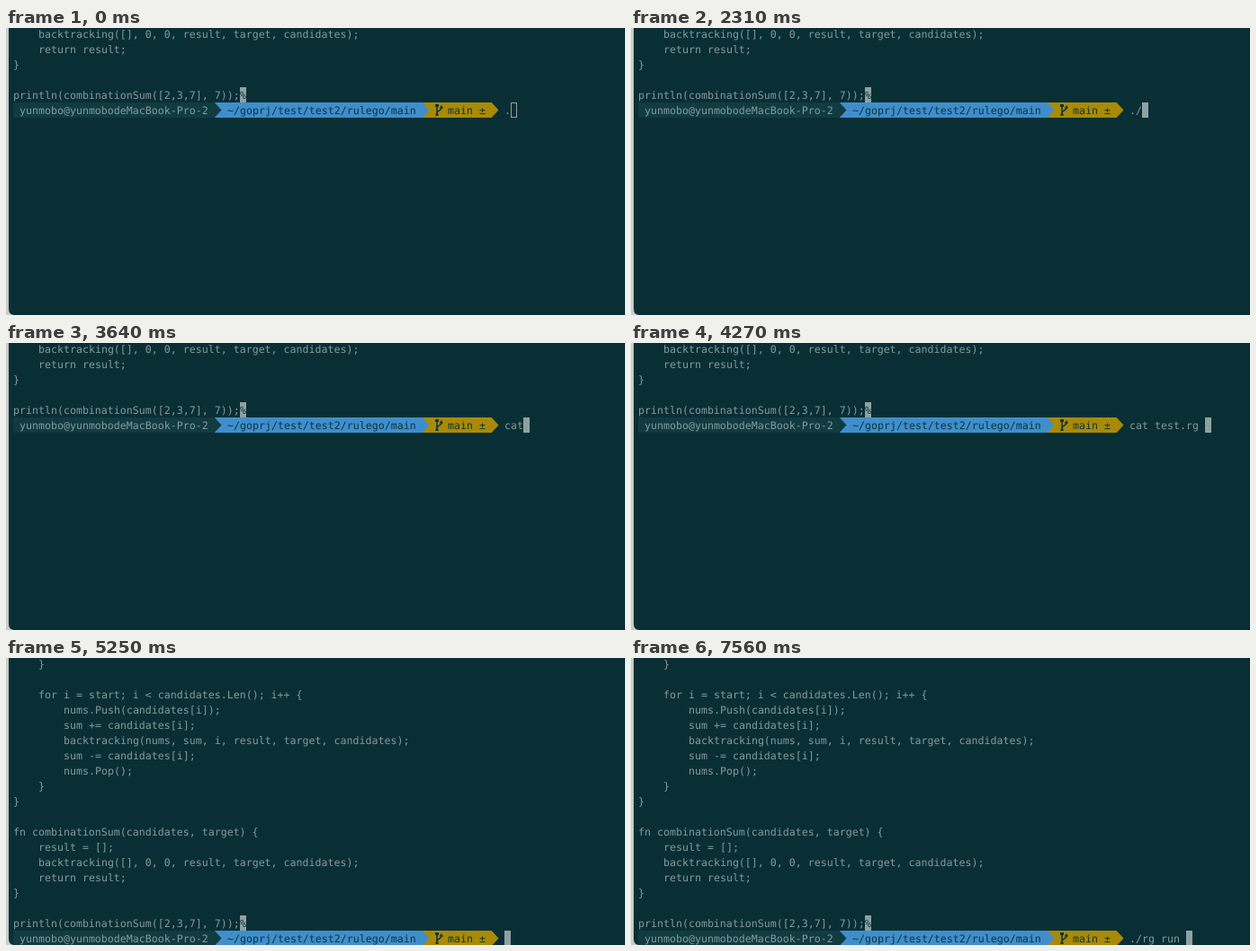
These frames come from a looping animation (688x320 px, 8000 ms). An HTML page:

```html
<!DOCTYPE html>
<html lang="en">
<head>
<meta charset="utf-8">
<title>Terminal session</title>
<style>
html, body { margin: 0; width: 100%; height: 100%; overflow: hidden; background: #092f35; }
svg { display: block; width: 688px; height: 320px; }
text {
  font: 11.628px "DejaVu Sans Mono", monospace;
  white-space: pre;
  text-rendering: geometricPrecision;
  fill: #869a9a;
}
text.dark { fill: #0a3540; }
</style>
</head>
<body>
<svg id="stage" viewBox="0 0 688 320"></svg>
<script>
const LOOP = 8000, CELL = 7, ROW = 17, LEFT = 8, TOP = -2;
const C = { bg: '#092f35', host: '#103b41', blue: '#3f8ecb', gold: '#a98a07', ink: '#0a3540', cursor: '#8ea1a0', edge: '#c7cbca' };
const stage = document.getElementById('stage');
const colX = c => LEFT + c * CELL;
const rowY = r => TOP + r * ROW;

function add(parent, tag, attrs = {}, content) {
  const el = document.createElementNS('http://www.w3.org/2000/svg', tag);
  for (const key in attrs) el.setAttribute(key, attrs[key]);
  if (content !== undefined) el.textContent = content;
  parent.appendChild(el);
  return el;
}

const box = (parent, x, y, width, height, fill) => add(parent, 'rect', { x, y, width, height, fill });

function write(parent, col, row, str, cls = '') {
  // leading blanks become an x offset
  const indent = str.length - str.trimStart().length;
  return add(parent, 'text', { x: colX(col + indent), y: rowY(row) + 13, class: cls }, str.trimStart());
}

function arrow(parent, col, y, fill) {
  const x = colX(col);
  add(parent, 'path', { d: `M${x - .3} ${y}L${x + 7.5} ${y + ROW / 2}L${x - .3} ${y + ROW}Z`, fill });
}

function prompt(parent, row) {
  const g = add(parent, 'g'), y = rowY(row);
  box(g, colX(0), y, 32 * CELL, ROW, C.host);
  box(g, colX(32), y, 33 * CELL, ROW, C.blue);
  box(g, colX(65), y, 11 * CELL, ROW, C.gold);
  arrow(g, 32, y, C.host);
  arrow(g, 65, y, C.blue);
  arrow(g, 76, y, C.gold);
  write(g, 1, row, 'yunmobo@yunmobodeMacBook-Pro-2');
  write(g, 34, row, '~/goprj/test/test2/rulego/main', 'dark');
  write(g, 69, row, 'main ±', 'dark');
  const branch = add(g, 'g', { transform: `translate(${colX(67)} ${y})`, fill: C.ink });
  add(branch, 'path', { d: 'M2 3V14M7 6C7 10 2 8 2 12', fill: 'none', stroke: C.ink, 'stroke-width': 1.5 });
  add(branch, 'path', { d: 'M0 2H4V5H0ZM4.5 6.5L7 3L9 6.5ZM.5 12.5H3.5V15H.5Z' });
  return g;
}

function screen(lines) {
  const g = add(stage, 'g');
  lines.forEach((line, row) => line && write(g, 0, row, line));
  const last = lines.length - 1;
  box(g, colX(36), rowY(last), CELL, ROW, C.cursor);
  write(g, 36, last, '%', 'dark');
  return g;
}

const tail = [
  '    backtracking([], 0, 0, result, target, candidates);',
  '    return result;',
  '}',
  '',
  'println(combinationSum([2,3,7], 7));'
];
const listing = [
  '    }',
  '',
  '    for i = start; i < candidates.Len(); i++ {',
  '        nums.Push(candidates[i]);',
  '        sum += candidates[i];',
  '        backtracking(nums, sum, i, result, target, candidates);',
  '        sum -= candidates[i];',
  '        nums.Pop();',
  '    }',
  '}',
  '',
  'fn combinationSum(candidates, target) {',
  '    result = [];',
  ...tail
];

// window edge with a rounded lower corner
box(stage, 0, 0, 12, 320, C.edge);
add(stage, 'path', { d: 'M3 0H688V320H9Q3 320 3 313Z', fill: C.bg });

const before = screen(tail);
prompt(before, 5);
const after = screen(listing);
const nextPrompt = prompt(after, 18);
const command = write(stage, 78, 5, '');
const cursor = add(stage, 'rect');
const pointer = add(stage, 'path', {
  d: 'M398 204.5Q401.5 204.5 401.5 207V219Q401.5 221.5 398 221.5M405 204.5Q401.5 204.5 401.5 207M401.5 219Q401.5 221.5 405 221.5M399.5 215.5H403.5',
  fill: 'none', stroke: '#c4cecd', 'stroke-width': 1
});

// [time, typed text]
const typed = [
  [0, '.'], [1330, ''], [2100, '.'], [2310, './'], [3080, '.'], [3220, ''],
  ...[...'cat te'].map((_, i) => [3360 + i * 140, 'cat te'.slice(0, i + 1)]),
  [4270, 'cat test.rg '], [5040, ''],
  [6370, '.'], [6580, './'], [6790, './r'],
  ...[4, 5, 6, 7, 8].map((n, i) => [6930 + i * 140, './rg run'.slice(0, n)]),
  [7560, './rg run ']
];

const show = (el, on) => el.setAttribute('visibility', on ? 'visible' : 'hidden');

function setCursor(col, row, hollow) {
  const inset = hollow ? .5 : 0;
  const attrs = {
    x: colX(col) + inset, y: rowY(row) + inset,
    width: CELL - 2 * inset, height: ROW - 2 * inset,
    fill: hollow ? 'none' : C.cursor, stroke: hollow ? C.cursor : 'none'
  };
  for (const key in attrs) cursor.setAttribute(key, attrs[key]);
}

function draw(t) {
  const printed = t >= 5040, ready = t >= 5250;
  const row = printed ? 18 : 5;
  const str = typed.filter(step => step[0] <= t).pop()[1];
  before.style.display = printed ? 'none' : '';
  after.style.display = printed ? '' : 'none';
  show(nextPrompt, ready);
  command.textContent = str;
  command.setAttribute('y', rowY(row) + 13);
  setCursor(printed && !ready ? 0 : 78 + str.length, row, t < 140);
  show(pointer, t >= 980 && t < 1330);
}

const start = performance.now();
function tick() {
  draw((performance.now() - start) % LOOP);
  requestAnimationFrame(tick);
}
tick();
</script>
</body>
</html>
```
